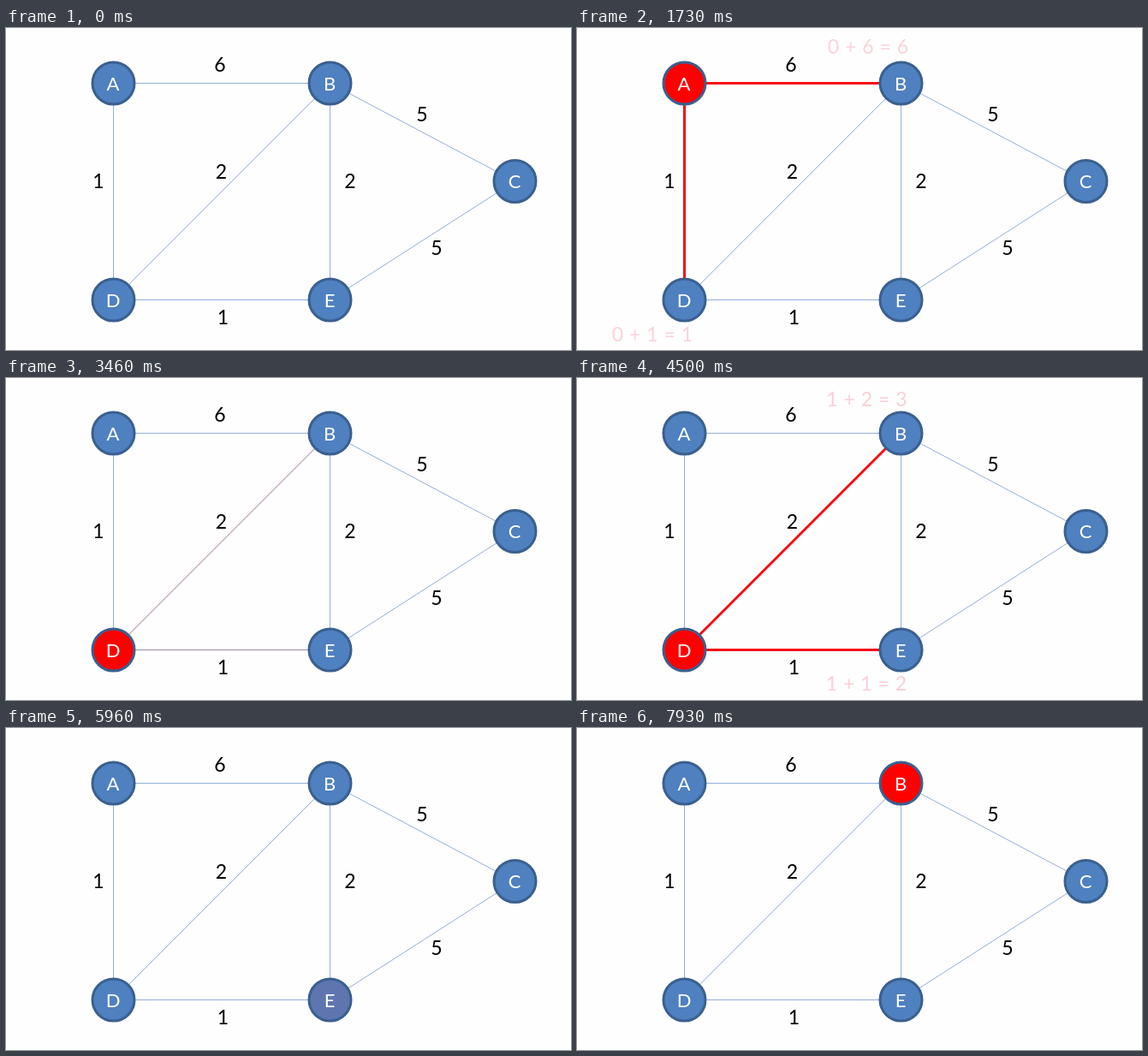
Write an HTML page with a canvas that moves like this. It is 660 px wide and 376 px high and loops after 8 s.

```html
<!DOCTYPE html>
<html lang="en">
<head>
<meta charset="utf-8">
<title>Shortest path</title>
<style>
html, body { margin: 0; width: 100%; height: 100%; overflow: hidden; background: #fefefe; }
canvas { display: block; }
</style>
</head>
<body>
<canvas id="stage" width="660" height="376"></canvas>
<script>
const ctx = document.getElementById('stage').getContext('2d');
const LOOP = 8000, FRAME = 1000 / 30;
const FONT = 'Lato, "Open Sans", sans-serif';

const nodes = {
  A: [125.5, 64.5], B: [378.5, 64.5], C: [594.5, 179],
  D: [125.5, 317.5], E: [378.5, 317.5]
};

// ends, weight, weight position
const edges = [
  ['AB', 6, 250, 43], ['AD', 1, 108, 179], ['BD', 2, 251.5, 168],
  ['BE', 2, 402, 179], ['BC', 5, 486, 101], ['CE', 5, 503, 257],
  ['DE', 1, 253.5, 338]
];

// each fade is [start, end]; everything clears at "reset"
const visits = [
  { node: 'A', fill: [640, 860], lines: [1010, 1200], sums: [1710, 1840], reset: 2595,
    paths: ['AB', 'AD'], text: [['0 + 6 = 6', 340, 22], ['0 + 1 = 1', 88, 358]] },
  { node: 'D', fill: [2870, 3000], lines: [3410, 3660], sums: [4463, 4650], reset: 5628,
    paths: ['BD', 'DE'], text: [['1 + 2 = 3', 338.5, 25], ['1 + 1 = 2', 338, 357]] },
  { node: 'E', fill: [5915, 6130], lines: [6310, 6465], sums: [6968, 7120], reset: 7362,
    paths: ['BE', 'CE'], text: [['2 + 2 = 4', 338, 24], ['2 + 5 = 7', 556, 139]] },
  { node: 'B', fill: [7720, 7930], lines: [LOOP, LOOP + 1], sums: [LOOP, LOOP + 1], reset: LOOP,
    paths: [], text: [] }
];

const fade = (t, [from, to]) => Math.min(1, Math.max(0, (t - from) / (to - from)));

function line([a, b], color, width) {
  ctx.strokeStyle = color;
  ctx.lineWidth = width;
  ctx.beginPath();
  ctx.moveTo(...nodes[a]);
  ctx.lineTo(...nodes[b]);
  ctx.stroke();
}

function disc([x, y], color) {
  ctx.fillStyle = color;
  ctx.beginPath();
  ctx.arc(x, y, 24.5, 0, Math.PI * 2);
  ctx.fill();
}

function label(text, x, y, color, size = 23) {
  ctx.font = `${size}px ${FONT}`;
  ctx.fillStyle = color;
  ctx.fillText(text, x, y + size * 0.36);
}

function draw(t) {
  const visit = visits.find(v => t < v.reset) || visits[visits.length - 1];
  ctx.globalAlpha = 1;
  ctx.fillStyle = '#fefefe';
  ctx.fillRect(0, 0, 660, 376);
  ctx.textAlign = 'center';
  ctx.wordSpacing = '1px';

  for (const [ends] of edges) line(ends, '#94aed8', 1);
  ctx.globalAlpha = fade(t, visit.lines);
  for (const ends of visit.paths) line(ends, '#f60c14', 3);
  ctx.globalAlpha = 1;

  for (const name in nodes) {
    const [x, y] = nodes[name];
    disc(nodes[name], '#4f80c0');
    if (name === visit.node) {
      ctx.globalAlpha = fade(t, visit.fill);
      disc(nodes[name], '#ff0000');
      ctx.globalAlpha = 1;
    }
    ctx.strokeStyle = '#3a608f';
    ctx.lineWidth = 3;
    ctx.beginPath();
    ctx.arc(x, y, 24.5, 0, Math.PI * 2);
    ctx.stroke();
    label(name, x - 0.5, y + 0.5, '#fff', 22);
  }

  for (const [, weight, x, y] of edges) label(weight, x, y, '#000');

  ctx.globalAlpha = fade(t, visit.sums);
  for (const [sum, x, y] of visit.text) label(sum, x, y, '#ee1236');
}

const start = performance.now();
function tick() {
  const t = (performance.now() - start) % LOOP;
  draw(Math.floor((t + 4) / FRAME) * FRAME % LOOP);
  requestAnimationFrame(tick);
}
tick();
</script>
</body>
</html>
```
